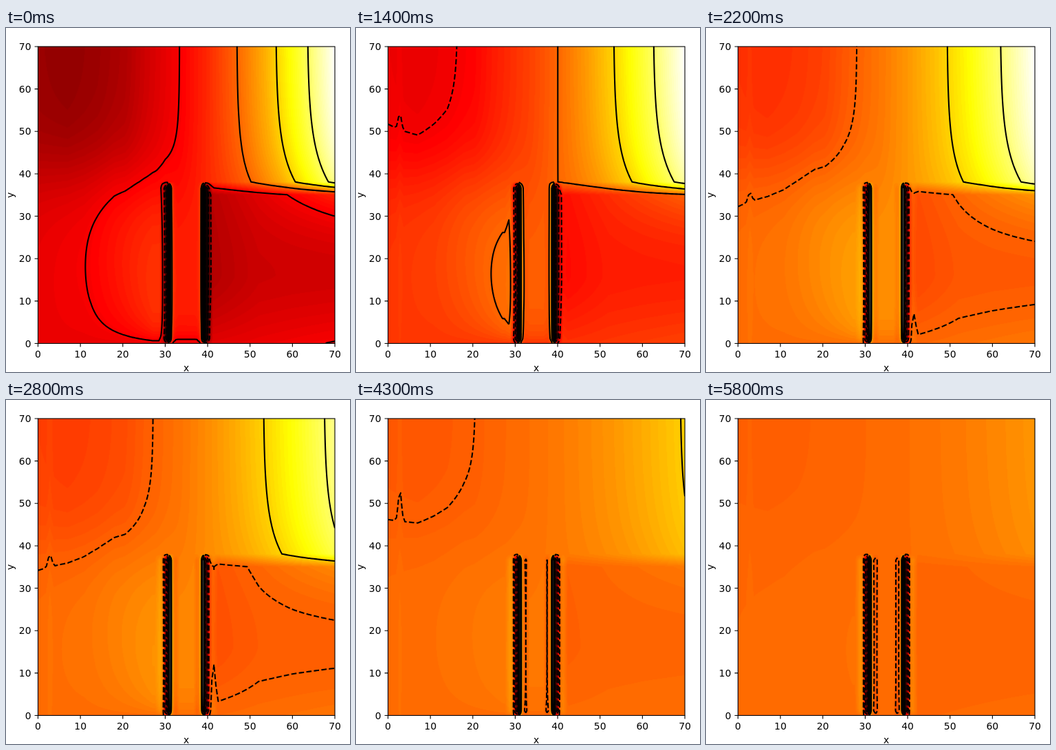
An HTML page with a canvas for the animation above (5900 ms loop, 500 by 500 pixels).

```html
<!DOCTYPE html>
<html lang="en">
<head>
<meta charset="utf-8">
<title>Contour plot</title>
<style>
html, body { margin: 0; width: 100%; height: 100%; overflow: hidden; background: #fff; }
canvas, svg { position: absolute; left: 0; top: 0; width: 500px; height: 500px; }
text { font: 13.9px "DejaVu Sans", sans-serif; }
</style>
</head>
<body>
<canvas id="plot" width="500" height="500"></canvas>
<svg id="axes" viewBox="0 0 500 500"></svg>
<script>
const LOOP = 5900, STEP = 100;
const X0 = 46.5, Y0 = 458, SIZE = 431.5, UNIT = SIZE / 70;
const clamp = (v, lo, hi) => Math.max(lo, Math.min(hi, v));

// Piecewise linear curve through [x, y] points
function curve(points) {
  return x => {
    if (x <= points[0][0]) return points[0][1];
    for (let i = 1; i < points.length; i++) {
      const [a, p] = points[i - 1], [b, q] = points[i];
      if (x <= b) return p + (q - p) * (x - a) / (b - a);
    }
    return points[points.length - 1][1];
  };
}

// Values over time: offset, gain, main contour level, level spacing, late wall halo, spike
const TIMES = [0, 800, 1400, 2200, 3500, 4300, 5800];
const track = (...values) => curve(TIMES.map((t, i) => [t, values[i]]));
const offset = track(.2, .27, .33, .43, .48, .495, .507);
const gain = track(.8, .73, .67, .57, .265, .18, .08);
const mainLevel = track(.518, .533, .518, .51, .509, .505, .5);
const spacing = track(.163, .161, .166, .175, .164, .164, .164);
const halo = track(0, .1, .2, .6, .75, .9, 1);
const spike = track(0, .012, .013, .014, .032, .038, .06);

// Horizontal profiles of the field
const topEdge = curve([[0, .015], [7, 0], [14, .02], [20.5, .055], [25, .11], [28, .14], [34, .2],
  [40, .28], [47, .4], [53.5, .535], [56, .6], [61, .73], [63, .79], [70, 1]]);
const lowerLeft = curve([[0, .168], [10.8, .2], [23, .28], [27, .3], [30, .3], [33, .26], [37, .26], [40, .28]]);
const lowerRight = curve([[40, .062], [42, .07], [47, .09], [52, .11], [60, .115], [70, .118]]);
const wall = curve([[28.8, 0], [29.5, -.1], [30, -.3], [30.5, -.5], [31, .5], [31.5, .12], [32, .02], [32.5, 0]]);
const wallHalo = curve([[27.6, 0], [28.8, .045], [29.5, .12], [30, 0], [31, 0], [31.5, -.05],
  [32, -.045], [32.5, -.042], [33.3, 0]]);

function leftField(x, y) {
  const mid = 40.5 - 3.5 * clamp((x - 18) / 10, 0, 1);
  const blend = 1 / (1 + Math.exp((y - mid) / 5.5));
  const rise = 1 - Math.exp(-(y + .1) / clamp(16 - .48 * x, 3, 10));
  const low = .168 + (lowerLeft(x) - .168) * rise;
  const top = topEdge(x);
  return top + (low - top) * blend;
}

function upperField(x, y) {
  const shift = 5.3 * (1 - Math.exp(-Math.max(0, x - 40) / 10));
  return topEdge(x - shift * Math.exp(-(y - 38) / 9));
}

function rightField(x, y) {
  if (y >= 38) return upperField(x, y);
  const ledge = .08 + (x - 41.5) * .0066;
  if (y > 35) return ledge + (upperField(x, 38) - ledge) * (y - 35) / 3;
  const base = lowerRight(x);
  if (y > 16) return base + (ledge - base) * ((y - 16) / 19) ** 2.2;
  return base + (.155 + (x - 42) * .0015 - base) * ((16 - y) / 16) ** 1.5;
}

const field = (x, y) => x < 39.75 ? leftField(x, y) : rightField(x, y);
const wallSpan = y => clamp(Math.min((y + .4) / 1.5, (38 - y) / 1.5), 0, 1);
const mirror = x => x > 35 ? 70 - x : x;

// Static samples of the field on an n by n lattice
function lattice(n, at) {
  const pos = Array.from({ length: n }, (_, i) => at(i));
  const base = new Float32Array(n * n);
  pos.forEach((y, j) => pos.forEach((x, i) => { base[j * n + i] = field(x, y); }));
  return {
    n, base, values: new Float32Array(n * n),
    wall: pos.map(x => wall(mirror(x))),
    halo: pos.map(x => wallHalo(mirror(x))),
    spike: pos.map(x => Math.max(0, 1 - Math.abs(x - 2.8) / .9)),
    span: pos.map(wallSpan)
  };
}

function update(g, t) {
  const c = offset(t), k = gain(t), h = halo(t), s = spike(t);
  const side = g.wall.map((w, i) => w + h * g.halo[i]);
  const extra = g.spike.map(v => k * s * v);
  for (let j = 0, p = 0; j < g.n; j++)
    for (let i = 0; i < g.n; i++, p++)
      g.values[p] = c + k * g.base[p] + extra[i] + side[i] * g.span[j];
}

const PIX = 432, CELLS = 140;
const pixels = lattice(PIX, i => (i + .5) / PIX * 70);
const grid = lattice(CELLS + 1, i => i * 70 / CELLS);

// Black-red-yellow-white colour scale in 100 bands
const palette = Array.from({ length: 100 }, (_, i) => {
  const v = (i + .5) / 100;
  return [.0416 + .9584 * v / .365, (v - .365) / .381, i > 98 ? 1 : (v - .746) / .254]
    .map(ch => Math.round(255 * clamp(ch, 0, 1)));
});

const ctx = document.getElementById("plot").getContext("2d");
const layer = document.createElement("canvas");
layer.width = layer.height = PIX;
const layerCtx = layer.getContext("2d");
const image = layerCtx.createImageData(PIX, PIX);

function paintBands() {
  for (let j = 0; j < PIX; j++) {
    for (let i = 0; i < PIX; i++) {
      const v = pixels.values[(PIX - 1 - j) * PIX + i];
      const rgb = palette[clamp(Math.floor(v * 100), 0, 99)];
      const o = 4 * (j * PIX + i);
      image.data[o] = rgb[0];
      image.data[o + 1] = rgb[1];
      image.data[o + 2] = rgb[2];
      image.data[o + 3] = 255;
    }
  }
  layerCtx.putImageData(image, 0, 0);
  ctx.drawImage(layer, X0, Y0 - SIZE, SIZE, SIZE);
}

// Marching squares; edge ids are 2 * node for horizontal and 2 * node + 1 for vertical edges
function contour(level) {
  const { n, values } = grid;
  const links = new Map();
  const join = (a, b) => {
    for (const [p, q] of [[a, b], [b, a]]) {
      if (links.has(p)) links.get(p).push(q);
      else links.set(p, [q]);
    }
  };
  for (let j = 0; j < CELLS; j++) {
    for (let i = 0; i < CELLS; i++) {
      const p = j * n + i;
      const a = values[p] > level, b = values[p + 1] > level;
      const c = values[p + n + 1] > level, d = values[p + n] > level;
      if (a === b && b === c && c === d) continue;
      const hit = [];
      if (a !== b) hit.push(2 * p);
      if (b !== c) hit.push(2 * (p + 1) + 1);
      if (c !== d) hit.push(2 * (p + n));
      if (d !== a) hit.push(2 * p + 1);
      for (let m = 0; m < hit.length; m += 2) join(hit[m], hit[m + 1]);
    }
  }
  const point = id => {
    const p = id >> 1, upright = id & 1;
    const f = (level - values[p]) / (values[p + (upright ? n : 1)] - values[p]);
    const x = p % n + (upright ? 0 : f), y = Math.floor(p / n) + (upright ? f : 0);
    return [X0 + x * SIZE / CELLS, Y0 - y * SIZE / CELLS];
  };
  const path = new Path2D(), seen = new Set();
  const walk = start => {
    let id = start;
    path.moveTo(...point(id));
    while (id !== undefined) {
      seen.add(id);
      path.lineTo(...point(id));
      const next = links.get(id).find(q => !seen.has(q));
      if (next === undefined && id !== start && links.get(id).includes(start)) path.lineTo(...point(start));
      id = next;
    }
  };
  for (const [id, near] of links) if (near.length === 1 && !seen.has(id)) walk(id);
  for (const id of links.keys()) if (!seen.has(id)) walk(id);
  return path;
}

function render(t) {
  update(pixels, t);
  update(grid, t);
  ctx.fillStyle = "#fff";
  ctx.fillRect(0, 0, 500, 500);
  paintBands();
  ctx.save();
  ctx.beginPath();
  ctx.rect(X0, Y0 - SIZE, SIZE, SIZE);
  ctx.clip();
  ctx.lineWidth = 2.08;
  ctx.lineJoin = "round";
  const lastDashed = t < 400 ? -2 : t < 1800 ? -1 : 0;
  for (let i = -3; i <= 2; i++) {
    ctx.setLineDash(i <= lastDashed ? [7.7, 3.33] : []);
    ctx.stroke(contour(mainLevel(t) + i * spacing(t)));
  }
  ctx.restore();
}

function drawAxes() {
  let marks = "", labels = "";
  for (let v = 0; v <= 70; v += 10) {
    const x = X0 + v * UNIT, y = Y0 - v * UNIT;
    marks += `M${x} ${Y0 + .5}v4.9M${X0} ${y + .5}h-4.9`;
    labels += `<text x="${x}" y="479" text-anchor="middle">${v}</text>`
      + `<text x="36.5" y="${y + 5.5}" text-anchor="end">${v}</text>`;
  }
  document.getElementById("axes").innerHTML =
    `<path d="${marks}" stroke="#000" stroke-width="1.1"/>
     <rect x="${X0}" y="${Y0 - SIZE + .5}" width="${SIZE}" height="${SIZE}" fill="none" stroke="#000" stroke-width="1.1"/>
     ${labels}
     <text x="262" y="498.5" text-anchor="middle">x</text>
     <text transform="translate(10.5 243) rotate(-90)" text-anchor="middle">y</text>`;
}

let shown = -1;
function tick() {
  const step = Math.floor(performance.now() % LOOP / STEP);
  if (step !== shown) {
    shown = step;
    render(step * STEP);
  }
  requestAnimationFrame(tick);
}

drawAxes();
tick();
</script>
</body>
</html>
```
